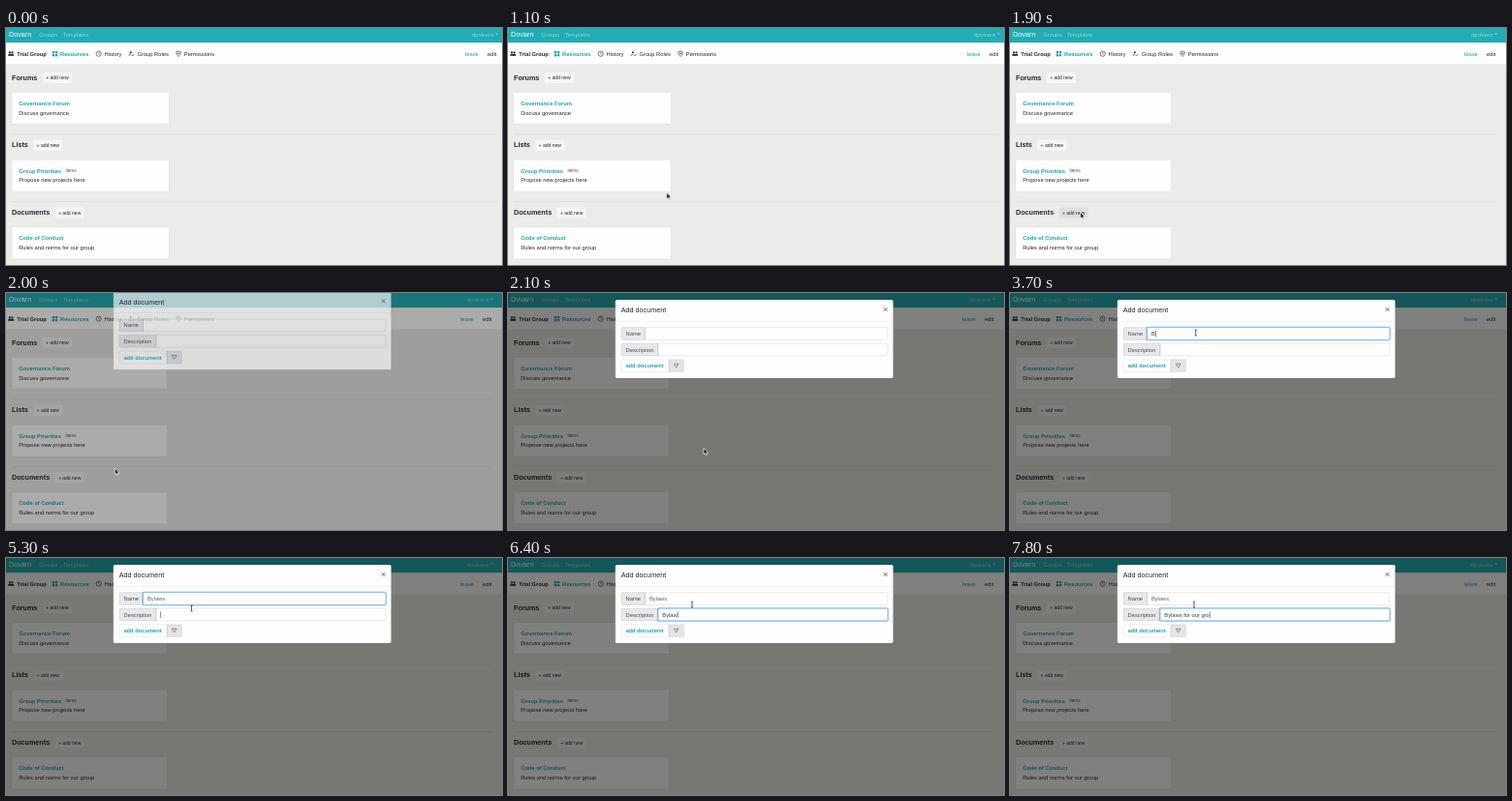
An HTML page with a canvas for the animation above (8000 ms loop, 512 by 245 pixels).

```html
<!DOCTYPE html>
<html lang="en">
<head>
<meta charset="utf-8">
<title>Resources</title>
<style>
html, body { margin: 0; width: 100%; height: 100%; overflow: hidden; background: #ebebea; }
canvas { display: block; width: 512px; height: 245px; }
</style>
</head>
<body>
<canvas id="stage"></canvas>
<script>
const W = 512, H = 245, LOOP = 8000, TICK = 100;
const BASE = 5.76, LARGE = 7.2, SMALL = 5.04;
const TEAL = '#22acb4', LINK = '#20a4ab', INK = '#24282c', PAPER = '#fefefe';
const OPEN = 2000, FOCUS = 3400, SWAP = 5300;

const canvas = document.getElementById('stage');
const ctx = canvas.getContext('2d');
const ratio = window.devicePixelRatio || 1;
canvas.width = W * ratio;
canvas.height = H * ratio;

// Each move starts where the one before it ended
const moves = [
  { from: 500, to: 800, x: 189.5, y: 162 },
  { from: 1000, to: 1200, x: 106, y: 189 },
  { from: 1300, to: 1600, x: 72.5, y: 190.5 },
  { from: 1900, to: 2100, x: 202, y: 160.5 },
  { from: 2300, to: 2400, x: 194.3, y: 54.5 },
  { from: 2500, to: 2700, x: 191.8, y: 41 },
  { from: 4500, to: 5200, x: 191.6, y: 52 },
  { from: 5600, to: 5800, x: 190, y: 48 }
];

const ramp = (t, from, to) => Math.min(1, Math.max(0, (t - from) / (to - from)));

function pointerAt(t) {
  const p = { x: 80, y: 5 };
  for (const m of moves) {
    const k = ramp(t, m.from, m.to) ** 1.7;
    p.x += (m.x - p.x) * k;
    p.y += (m.y - p.y) * k;
  }
  return { ...p, shown: t >= moves[0].from };
}

const over = (p, x, y, w, h) => p.shown && p.x >= x && p.x <= x + w && p.y >= y && p.y <= y + h;

// First letter at `from`, last at `to`; a pace above 1 starts slowly
function typed(str, t, from, to, pace) {
  if (t < from) return '';
  return str.slice(0, 1 + Math.floor((str.length - 1) * ramp(t, from, to) ** pace));
}

// Draws a line of text and returns where it ends
function text(str, x, y, size = BASE, color = INK, style = '') {
  ctx.font = `${style} ${size}px "Liberation Sans", Arial, sans-serif`;
  ctx.fillStyle = color;
  ctx.fillText(str, x, y);
  return x + ctx.measureText(str).width;
}

function rect(x, y, w, h, color) {
  ctx.fillStyle = color;
  ctx.fillRect(x, y, w, h);
}

function paint(fill, stroke, line) {
  if (fill) { ctx.fillStyle = fill; ctx.fill(); }
  if (stroke) { ctx.strokeStyle = stroke; ctx.lineWidth = line; ctx.stroke(); }
}

function box(x, y, w, h, r, fill, stroke, line = 0.4) {
  ctx.beginPath();
  ctx.roundRect(x, y, w, h, r);
  paint(fill, stroke, line);
}

function disc(x, y, r, fill, stroke, line) {
  ctx.beginPath();
  ctx.arc(x, y, r, 0, 7);
  paint(fill, stroke, line);
}

function path(points, fill, stroke, line) {
  ctx.beginPath();
  points.forEach(([x, y]) => ctx.lineTo(x, y));
  paint(fill, stroke, line);
}

function person(x, y) {
  disc(x, y - 1.4, 1.1, INK);
  box(x - 1.7, y + 0.1, 3.4, 2, [1.2, 1.2, 0, 0], INK);
}

function grid(x, y) {
  for (const dx of [-2.8, 0.3])
    for (const dy of [-2.7, 0.3]) rect(x + dx, y + dy, 2.4, 2.3, LINK);
}

function clock(x, y) {
  disc(x, y, 2.6, null, INK, 0.6);
  path([[x, y - 1.7], [x, y], [x + 1.2, y + 0.8]], null, INK, 0.5);
}

function checkedPerson(x, y) {
  disc(x - 0.8, y - 1.5, 1, INK);
  path([[x - 2.8, y + 2.3], [x - 2.2, y + 0.9], [x - 0.4, y + 0.6]], null, INK, 0.6);
  path([[x, y + 1.3], [x + 1, y + 2.3], [x + 2.8, y + 0.2]], null, INK, 0.6);
}

function shield(x, y) {
  ctx.beginPath();
  ctx.moveTo(x, y - 2.8);
  ctx.lineTo(x + 2.3, y - 1.9);
  ctx.quadraticCurveTo(x + 2.3, y + 1.7, x, y + 2.7);
  ctx.quadraticCurveTo(x - 2.3, y + 1.7, x - 2.3, y - 1.9);
  ctx.closePath();
  paint(null, INK, 0.6);
  disc(x, y - 0.5, 0.8, INK);
}

function header(right, pointer) {
  const faint = 'rgba(255,255,255,.52)', lit = 'rgba(255,255,255,.78)';
  rect(0, 0, W, 15.3, TEAL);
  text('Dovarn', 3, 9.2, LARGE, '#fff');
  text('Groups', 34.3, 8.6, BASE, faint);
  text('Templates', 58.8, 8.6, BASE, over(pointer, 58.8, 3, 27, 7) ? lit : faint);
  text('dpolvera', right - 31, 8.5, BASE, faint, 'italic');
  const x = right - 7;
  path([[x, 5.6], [x + 3, 5.6], [x + 1.5, 7.3]], faint);
}

function nav(right) {
  const mid = 26.7, base = 28.6;
  rect(0, 15.3, W, 21.9, PAPER);
  person(3.9, mid);
  person(6.5, mid);
  text('Trial Group', 11.2, base, BASE, INK, 'bold');
  grid(50.5, mid);
  let x = text('Resources', 56, base, BASE, LINK, 'bold');
  const tabs = [['History', clock], ['Group Roles', checkedPerson], ['Permissions', shield]];
  for (const [label, icon] of tabs) {
    icon(x + 10.3, mid);
    x = text(label, x + 16.1, base);
  }
  text('leave', right - 38, 28.8, BASE, '#1699bd');
  text('edit', right - 15, 28.8);
}

function section(title, y, cardTitle, about, right, pointer, tag = '') {
  const x = text(title, 6, y + 2.6, LARGE, INK, 'bold') + 5.6;
  const hover = over(pointer, x, y - 5, 30, 11);
  box(x, y - 5, 30, 11, 1.2, hover ? '#dddfe1' : '#f6f6f6');
  text('+ add new', x + 3.2, y + 2.2, SMALL);

  box(6, y + 15.5, right / 3 - 8.7, 32.6, 1.2, PAPER, 'rgba(0,0,0,.1)');
  const end = text(cardTitle, 13.2, y + 28.7, BASE, LINK, 'bold');
  text(tag, end + 4.5, y + 28.6, 4.6, '#555');
  text(about, 13.2, y + 38.6);
}

function page(t, pointer) {
  const right = t >= 1900 ? W - 5 : W;
  const top = 51, step = 69.8;
  rect(0, 0, W, H, '#ebebea');
  header(right, pointer);
  nav(right);
  section('Forums', top, 'Governance Forum', 'Discuss governance', right, pointer);
  section('Lists', top + step, 'Group Priorities', 'Propose new projects here', right, pointer, 'items');
  section('Documents', top + 2 * step, 'Code of Conduct', 'Rules and norms for our group', right, pointer);
  for (const n of [1, 2]) rect(6, top + n * step - 11, right - 11, 0.4, 'rgba(0,0,0,.12)');
}

function field(label, y, value, focus, caret) {
  const left = 117, right = 392, h = 12.8, border = 'rgba(60,75,90,.28)';
  const end = text(label, left + 4.6, y + 8.5, BASE, '#495057');
  const split = end + 4.5, w = right - split;
  box(left, y, split - left, h, [1.4, 0, 0, 1.4], 'rgba(30,45,60,.1)', border);
  box(split, y, w, h, [0, 1.4, 1.4, 0], null, border);
  if (focus > 0) {
    box(split - 0.5, y - 0.5, w + 1, h + 1, 1.6, null, `rgba(0,123,255,${0.28 * focus})`, 1.2);
    box(split, y, w, h, [0, 1.4, 1.4, 0], null, `rgba(105,175,240,${focus})`, 0.6);
  }
  const x = text(value, split + 4.5, y + 8.5, BASE, caret ? '#3a3f44' : '#5d6369');
  if (caret) rect(x + 0.2, y + 3.3, 0.5, 6.6, '#222');
}

function modal(t) {
  const shown = ramp(t, OPEN - TICK, OPEN + TICK);
  rect(0, 0, W, H, `rgba(4,4,0,${0.17 + 0.33 * shown})`);

  ctx.save();
  ctx.translate(0, -17.4 * (1 - shown));
  const x = 110.8, y = 6.9, w = 286.8;
  box(x, y, w, 81, 1.6, `rgba(254,254,254,${0.32 + 0.68 * shown})`, 'rgba(0,0,0,.15)');
  text('Add document', 116.8, 20.4, LARGE);
  for (const d of [-1.8, 1.8])
    path([[389.6 - d, 15.2], [389.6 + d, 18.8]], null, '#444', 0.8);
  rect(x, 29, w, 0.4, 'rgba(30,45,60,.13)');

  const swap = ramp(t, SWAP, SWAP + 150);
  const nameFocus = ramp(t, FOCUS, FOCUS + 200) * (1 - swap);
  field('Name', 35.6, typed('Bylaws', t, 3700, 4400, 1), nameFocus, t > FOCUS && t < SWAP);
  field('Description', 52.1, typed('Bylaws for our gro', t, 5800, 7800, 1.2), swap, t >= SWAP);

  box(117, 68.8, 49, 12.8, [1.4, 0, 0, 1.4], null, 'rgba(30,45,60,.16)');
  text('add document', 121.4, 77.2, BASE, LINK, 'bold');
  box(166, 68.8, 15.6, 12.8, [0, 1.4, 1.4, 0], 'rgba(30,45,60,.12)', 'rgba(30,45,60,.16)');
  path([[171.3, 73.2], [176.1, 73.2], [173.7, 77], [171.3, 73.2]], null, '#50565c', 0.6);
  ctx.restore();
}

function arrow(x, y) {
  const shape = [[0, 0], [0, 6.4], [1.5, 5.1], [2.5, 7.3], [3.6, 6.8], [2.7, 4.7], [4.7, 4.6], [0, 0]];
  path(shape.map(([a, b]) => [x + a, y + b]), '#111', '#fff', 0.7);
}

function beam(x, y) {
  rect(x - 0.35, y - 3, 0.7, 6, '#222');
  for (const end of [-3.2, 2.7]) rect(x - 1.2, y + end, 2.4, 0.6, '#222');
}

function draw(t) {
  const pointer = pointerAt(t);
  ctx.setTransform(ratio, 0, 0, ratio, 0, 0);
  page(t, pointer);
  if (t >= OPEN) modal(t);
  const overField = t > OPEN && over(pointer, 141, 35, 251, 30);
  if (pointer.shown) (overField ? beam : arrow)(pointer.x, pointer.y);
}

const start = performance.now();
function frame() {
  const t = (performance.now() - start) % LOOP;
  draw(Math.floor(t / TICK) * TICK);
  requestAnimationFrame(frame);
}
frame();
</script>
</body>
</html>
```
